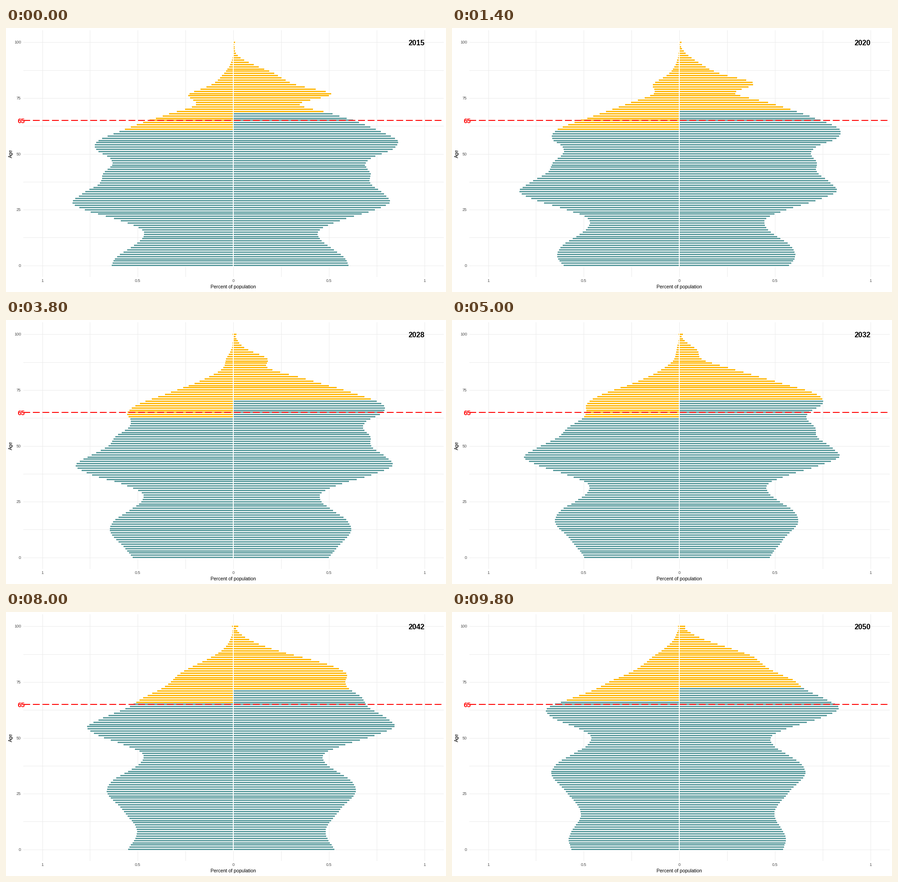
These frames come from a looping animation (966x580 px, 10 s). A matplotlib script:

```python
import numpy as np
import matplotlib.pyplot as plt
from matplotlib.animation import FuncAnimation
from matplotlib.collections import PolyCollection

W, H = 966, 580
PT = 0.72                      # points per pixel at 100 dpi
MID, UNIT = 499, 419.5         # x of zero, pixels per percent
BASE, STEP = 521.8, 4.906      # y of age 0, pixels per year of age
TEAL, GOLD, GRID = "#5F9EA0", "#FFB90F", "#EBEBEB"
START, SPAN = 2015, 35

# Women's bar length by age in 2015; negative ages are later births.
WAVES = [(-35, 207), (-31, 212), (-18, 190), (-9, 220), (0, 252), (4, 241),
         (8, 213), (12, 189), (16, 189), (20, 233), (24, 296), (28, 342),
         (32, 330), (37, 300), (41, 301), (46, 290), (48, 301), (52, 349),
         (56, 360), (60, 323), (68, 217), (72, 145), (77, 214), (81, 137),
         (86, 89), (94, 9), (100, 1)]
ages = np.arange(101)


def smooth(x, points):
    """Cubic Hermite curve through the points, flat outside them."""
    xs, ys = np.array(points, float).T
    slope = np.gradient(ys, xs)
    x = np.clip(x, xs[0], xs[-1])
    i = np.clip(np.searchsorted(xs, x, side="right") - 1, 0, len(xs) - 2)
    h = xs[i + 1] - xs[i]
    s = (x - xs[i]) / h
    return ((1 + 2 * s) * (1 - s) ** 2 * ys[i] + s * (1 - s) ** 2 * h * slope[i]
            + s * s * (3 - 2 * s) * ys[i + 1] - s * s * (1 - s) * h * slope[i + 1])


def survivors(t, size, growth, risk, pace, now, better):
    """Cohorts aged by t years: share growth less Gompertz mortality."""
    lost = risk * (np.exp(pace * (ages - 80)) - np.exp(pace * (ages - t - 80)))
    gain = growth * (0.0015 * t + 0.000035 * t * t)
    return size * np.exp(gain - (now - better * t) * lost)


def women(t):
    bars = survivors(t, smooth(ages - t, WAVES), 1, 0.447, 0.105, 1.37, 0.0105)
    bars[100] = 3 + 9.5 * t / SPAN     # 100 and over
    return bars, round(69.3 + 0.099 * t)


def men(t):
    age = np.maximum(ages - t, 0)
    fewer = 0.006 * np.maximum(age - 24, 0) + (age / 84) ** 7
    size = smooth(ages - t, WAVES) / 0.947 * np.exp(-fewer)
    bars = survivors(t, size, 0.85, 1.128, 0.079, 1.45, 0.013)
    bars[100] = 0.5 + 2.5 * t / SPAN
    return bars, max(61, round(60 + 0.204 * t))


def rects(x0, x1, half):
    y = BASE - STEP * ages
    x0 = np.full(len(ages), x0)
    return np.stack([np.stack([x0, y - half], 1), np.stack([x1, y - half], 1),
                     np.stack([x1, y + half], 1), np.stack([x0, y + half], 1)], 1)


plt.rcParams["font.family"] = "Liberation Sans"
fig = plt.figure(figsize=(W / 100, H / 100), dpi=100, facecolor="white")
ax = fig.add_axes([0, 0, 1, 1])
ax.set(xlim=(0, W), ylim=(H, 0))
ax.axis("off")


def label(x, y, text, size, **kw):
    kw = {"ha": "center", "va": "baseline", "zorder": 6, **kw}
    return ax.text(x, y, text, fontsize=size * PT, **kw)


for q in np.arange(-1, 1.01, 0.25):
    x = MID + q * UNIT
    ax.plot([x, x], [5, 546], color=GRID, lw=PT, zorder=1)
    if q * 2 % 1 == 0:
        label(x, 558.5, f"{abs(q):g}", 9, color="#4D4D4D")
for a in np.arange(0, 101, 12.5):
    y = BASE - STEP * a
    ax.plot([38, 960], [y, y], color=GRID, lw=PT, zorder=1)
    if a % 25 == 0:
        label(33, y + 3.2, f"{a:g}", 9, ha="right", color="#4D4D4D")
label(MID, 572.5, "Percent of population", 10.5)
label(11, 276, "Age", 10.5, rotation=90, va="center")

halo = PolyCollection([], facecolor="white", lw=0, antialiased=False, zorder=2)
bars = PolyCollection([], lw=0, antialiased=False, zorder=3)
ax.add_collection(halo, autolim=False)
ax.add_collection(bars, autolim=False)

y65 = BASE - STEP * 65
ax.plot([38, 960], [y65, y65], color="red", lw=2 * PT, ls=(0, (7, 3)),
        dash_capstyle="butt", antialiased=False, zorder=5)
label(33, 209, "65", 14.5, color="red", weight="bold")
clock = label(919, 37.5, "", 16, ha="right", weight="bold")


def year_at(ms):
    if ms < 200:
        return START
    if ms < 8600:
        return START + 1 + (ms - 200) // 300
    return START + 29 + (ms - 8600) // 200


def draw(i):
    year = year_at(i * 100)
    back, front, colors = [], [], []
    for sign, people in ((-1, men), (1, women)):
        length, pension = people(year - START)
        end = np.maximum(length, 0.5) + 0.5
        back.append(rects(MID, MID + sign * (end + 1), 2.8))
        front.append(rects(MID + sign, MID + sign * end, 1.5))
        colors += [GOLD if a >= pension else TEAL for a in ages]
    halo.set_verts(np.concatenate(back))
    bars.set_verts(np.concatenate(front))
    bars.set_facecolor(colors)
    clock.set_text(str(year))
    return halo, bars, clock


anim = FuncAnimation(fig, draw, frames=100, interval=100, repeat=True,
                     repeat_delay=0, blit=False)
plt.show()
```
